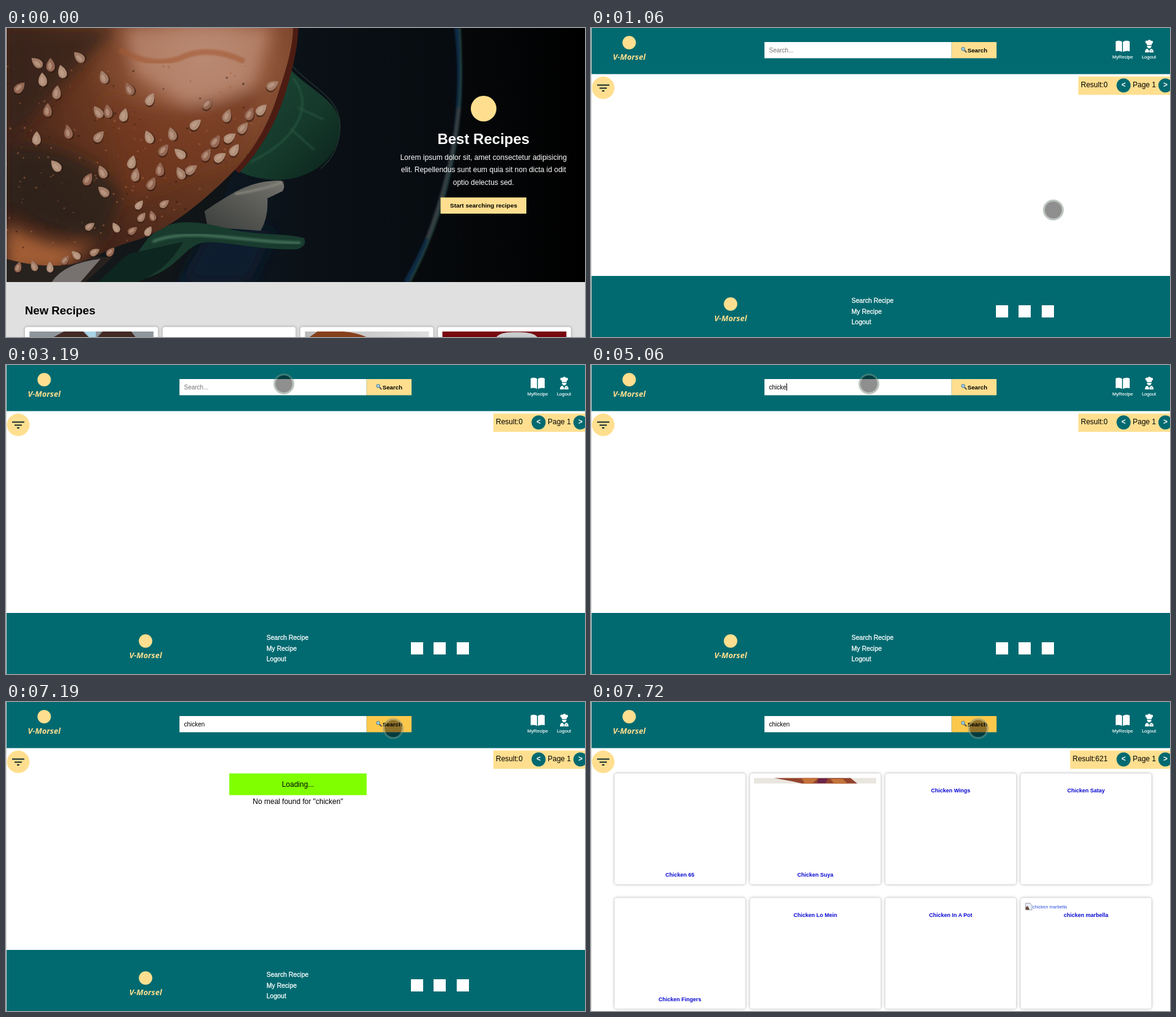
Write an HTML page that moves like this. It is 948 px wide and 506 px high and loops after 7.99 s.

```html
<!DOCTYPE html>
<html lang="en">
<head>
<meta charset="utf-8">
<title>Recipe search</title>
<style>
html, body { margin: 0; width: 100%; height: 100%; overflow: hidden; background: #fff; }
svg { display: block; width: 100%; height: 100%; }
text { font-family: "Liberation Sans", Arial, sans-serif; font-size: 12px; white-space: pre; }
.b { font-weight: bold; }
.mid { text-anchor: middle; }
.w { fill: #fff; }
.teal { fill: #006a70; }
.cream { fill: #ffdf8f; }
.brand { font: italic bold 13px "Noto Sans", sans-serif; fill: #ffdf8f; }
.nav { font-size: 7.6px; fill: #fff; stroke: #fff; stroke-width: .15; }
.link { font-size: 10.5px; fill: #fff; stroke: #fff; stroke-width: .3; }
.title { font-size: 9px; font-weight: bold; fill: #0909d2; }
.card { fill: #fff; filter: drop-shadow(0 0 2px rgba(0,0,0,.35)); }
</style>
</head>
<body>
<svg viewBox="0 0 948 506" preserveAspectRatio="none">
<defs>
  <linearGradient id="night"><stop offset="0" stop-color="#171b1c"/><stop offset=".55" stop-color="#0b1014"/><stop offset=".8" stop-color="#050709"/><stop offset="1" stop-color="#000"/></linearGradient>
  <linearGradient id="plate"><stop offset="0" stop-color="#0e1a27"/><stop offset=".5" stop-color="#0a1015"/><stop offset="1" stop-color="#070b10"/></linearGradient>
  <radialGradient id="crust" gradientUnits="userSpaceOnUse" cx="325" cy="45" r="400">
    <stop offset="0" stop-color="#b58672"/><stop offset=".25" stop-color="#92583c"/><stop offset=".5" stop-color="#6a3820"/><stop offset=".8" stop-color="#4b281b"/><stop offset="1" stop-color="#3a2018"/>
  </radialGradient>
  <linearGradient id="leaf" x1="0" y1="0" x2="1" y2="1"><stop offset="0" stop-color="#1c4a37"/><stop offset=".6" stop-color="#15392b"/><stop offset="1" stop-color="#0b221b"/></linearGradient>
  <linearGradient id="onion" x1="1" y1="0" x2="0" y2="1"><stop offset="0" stop-color="#74736d"/><stop offset="1" stop-color="#3a3d3b"/></linearGradient>
  <linearGradient id="gray"><stop offset="0" stop-color="#b9b9b9"/><stop offset="1" stop-color="#dedede"/></linearGradient>
  <filter id="soft" x="-30%" y="-30%" width="160%" height="160%"><feGaussianBlur stdDeviation="12"/></filter>
  <filter id="haze"><feGaussianBlur stdDeviation="1.5"/></filter>
  <clipPath id="photo"><rect width="948" height="416"/></clipPath>
  <clipPath id="bun"><path id="bunEdge" d="M0 0H470C470 32 458 70 446 106C432 152 410 195 375 232C330 278 270 330 212 348C160 362 140 382 100 388C60 392 25 385 0 378Z"/></clipPath>
  <g id="logo"><circle class="cream" cx="62.5" cy="24" r="11"/><text class="brand mid" x="62.5" y="52">V-Morsel</text></g>
</defs>

<g id="home">
  <rect width="948" height="506" fill="#e0e0e0"/>
  <g clip-path="url(#photo)">
    <rect width="948" height="416" fill="url(#night)"/>
    <path d="M470 0H738C752 110 738 275 658 416H280L330 340Z" fill="url(#plate)"/>
    <path d="M285 416L330 335L440 330L400 416Z" fill="#0e1c2d" filter="url(#soft)"/>
    <g fill="none" filter="url(#haze)">
      <path d="M738 0C752 110 738 275 655 416" stroke="#102a45" stroke-width="8"/>
      <path d="M743 0C752 150 730 285 661 416" stroke="#22423d" stroke-width="3"/>
      <path d="M742 130C736 185 722 260 690 345" stroke="#343c40" stroke-width="6"/>
    </g>
    <path d="M456 55C480 95 549 115 547 162C546 214 500 249 440 249C400 246 380 236 372 226Z" fill="url(#leaf)"/>
    <path d="M470 82C500 120 490 175 400 220M478 130L520 150M466 165L505 200" fill="none" stroke="#2d6049" stroke-width="3" opacity=".6" filter="url(#haze)"/>
    <path d="M452 40C485 95 547 105 547 160C547 190 535 215 515 230" fill="none" stroke="#294239" stroke-width="1.5" opacity=".7"/>
    <path d="M325 300C370 270 400 249 450 250Q459 256 453 267L428 279Q430 310 417 332L330 326Z" fill="url(#onion)"/>
    <path d="M375 272C410 266 440 258 453 252" fill="none" stroke="#858379" stroke-width="4" filter="url(#haze)"/>
    <path d="M232 345C270 305 320 318 370 330C420 341 455 335 488 344Q494 356 478 362C420 366 350 346 320 352C285 360 275 416 180 416Z" fill="#183b2d"/>
    <path d="M240 350C300 325 380 350 482 352" fill="none" stroke="#3f6a55" stroke-width="5" filter="url(#haze)"/>
    <path d="M200 370L290 350C270 385 250 400 215 416H150Z" fill="#0d261f"/>
    <path d="M0 375H175L130 416H0Z" fill="#28221f"/>
    <path d="M75 416Q95 385 155 378L122 416Z" fill="#777270"/>
    <path d="M470 0C470 32 460 70 448 108C434 152 410 195 375 232" fill="none" stroke="#4c1c13" stroke-width="17"/>
    <use href="#bunEdge" fill="url(#crust)"/>
    <g clip-path="url(#bun)">
      <g filter="url(#soft)">
        <path d="M0 0H180L110 75L0 190Z" fill="#32231e" opacity=".75"/>
        <path d="M0 195Q110 180 190 270L160 350L70 330L0 290Z" fill="#29201d" opacity=".75"/>
        <path d="M195 0H435L405 95L300 125L210 75Z" fill="#bd8b75" opacity=".75"/>
        <path d="M160 110Q290 160 425 90L380 205L200 280Z" fill="#71371d" opacity=".65"/>
        <path d="M0 320Q90 370 145 350L90 400H0Z" fill="#a15d36"/>
      </g>
      <path d="M185 35Q245 70 295 45Q340 30 390 55" fill="none" stroke="#a35a35" stroke-width="9" opacity=".6" filter="url(#haze)"/>
      <g id="crumbs"></g>
    </g>
    <g id="seeds"></g>
  </g>
  <circle class="cream" cx="782" cy="132" r="21"/>
  <text class="b w mid" x="781.8" y="190" style="font-size:24px">Best Recipes</text>
  <g class="w mid">
    <text x="781.8" y="216">Lorem ipsum dolor sit, amet consectetur adipisicing</text>
    <text x="781.8" y="236">elit. Repellendus sunt eum quia sit non dicta id odit</text>
    <text x="781.8" y="257">optio delectus sed.</text>
  </g>
  <rect class="cream" x="711.5" y="277.5" width="140.5" height="26.5"/>
  <text class="b mid" x="782" y="294" style="font-size:9.95px">Start searching recipes</text>
  <text class="b" x="31" y="469" style="font-size:18.7px">New Recipes</text>
  <g id="teasers"></g>
  <g>
    <rect x="38.5" y="497" width="203" height="9" fill="#8d969b"/>
    <path d="M78 506L95 497H126L135 506ZM150 506L158 497H205L212 506Z" fill="#432b24"/>
    <path d="M128 497H147V506H136Z" fill="#a9d4e6"/>
    <rect x="489.5" y="497" width="203" height="9" fill="url(#gray)"/>
    <path d="M497 506L510 497H552Q575 499 590 506Z" fill="#87401c"/>
    <rect x="714.5" y="497" width="203" height="9" fill="#770810"/>
    <path d="M803 506Q810 497 835 498Q862 497 870 506Z" fill="#c9cccd"/>
  </g>
</g>

<g id="search">
  <rect class="w" width="948" height="506"/>
  <g id="foot">
    <rect class="teal" y="406" width="948" height="100"/>
    <use href="#logo" x="166" y="428"/>
    <text class="link" x="426.5" y="450">Search Recipe</text>
    <text class="link" x="426.5" y="468">My Recipe</text>
    <text class="link" x="426.5" y="485">Logout</text>
    <path class="w" d="M663 454h20v20h-20zM700 454h20v20h-20zM738 454h20v20h-20z"/>
  </g>
  <rect class="teal" width="948" height="75.5"/>
  <use href="#logo"/>
  <rect class="w" x="284" y="23" width="306.5" height="26.5"/>
  <text id="field" x="291.5" y="40" style="font-size:10px"></text>
  <rect id="caret" y="30" width="1" height="12"/>
  <rect id="button" x="590.5" y="23" width="73.5" height="26.5"/>
  <path d="M611.5 36.5L615 40" stroke="#4a4f55" stroke-width="1.8"/>
  <circle cx="609.3" cy="34.3" r="2.8" fill="#9ccfe8" stroke="#4c7384" stroke-width="1"/>
  <text class="b" x="616.5" y="40" style="font-size:9.7px">Search</text>
  <path class="w" d="M859 22Q865 19.500 869.500 22.500V39Q865 36.500 859 38ZM871 22.500Q876 19.500 882 22V38Q876 36.500 871 39Z"/>
  <path class="w" d="M910 26C905 23 909 19 911.500 21C913 18.500 916 19 916.500 21C920 20 922 24 918 26V28H910ZM910.500 29H917.500V31Q914 36 910.500 31ZM907 40Q907 34.500 911 34L914 37L917 34Q921 34.500 921 40Z"/>
  <path d="M914 36.500V40M916.500 37.500H919" stroke="#006a70" stroke-width=".8"/>
  <text class="nav mid" x="870.5" y="50">MyRecipe</text>
  <text class="nav mid" x="913.500" y="50">Logout</text>
  <circle class="cream" cx="20" cy="98" r="18.500"/>
  <path d="M10 93.500H30M14 98.500H26M18 103H22" stroke="#13292b" stroke-width="2"/>
  <rect id="tally" class="cream" y="79.500" width="170" height="30"/>
  <text id="count" y="97"></text>
  <circle class="teal" cx="872" cy="94" r="11.500"/>
  <circle class="teal" cx="940.500" cy="94" r="11.500"/>
  <text class="b w mid" x="872" y="97">&lt;</text>
  <text class="b w mid" x="940.500" y="97">&gt;</text>
  <text x="887" y="97">Page 1</text>
  <g id="loading">
    <rect x="365.5" y="117" width="225" height="35.500" fill="#80ff00"/>
    <text class="mid" x="478" y="139">Loading...</text>
    <text class="mid" x="478" y="167">No meal found for "chicken"</text>
  </g>
  <g id="cards"></g>
  <g id="pics">
    <rect x="267" y="124.500" width="200" height="9" fill="#e9e6df"/>
    <path d="M300 124.500H425L436 133.500H345L330 130Z" fill="#94442e"/>
    <path d="M345 124.500H372L362 133.500H350ZM392 126H412L420 133.500H398Z" fill="#c4743a"/>
    <path d="M372 125H388L384 133H370Z" fill="#6b2548"/>
    <path d="M711.500 329.500H719L722 332.500V340.500H711.500Z" fill="#e7eefb" stroke="#8b9097" stroke-width=".8"/>
    <path d="M712 340V336L715 334L718 340Z" fill="#6a4637"/>
    <text x="723" y="338" style="font-size:7.5px;fill:#2a50e0">chicken marbella</text>
  </g>
</g>
<rect width="1" height="506" fill="#d6d6d6"/>
<g id="cursor">
  <circle id="dot" r="14"/>
  <circle id="ring" r="15.5" fill="none" stroke="rgba(120,138,125,.5)" stroke-width="3"/>
</g>
</svg>
<script>
const LOOP = 7990;
const $ = id => document.getElementById(id);
const show = (id, on) => $(id).setAttribute('display', on ? 'inline' : 'none');
const add = (parent, tag, attrs, text = '') => {
  const el = document.createElementNS('http://www.w3.org/2000/svg', tag);
  for (const k in attrs) el.setAttribute(k, attrs[k]);
  el.textContent = text;
  parent.append(el);
  return el;
};
let state = 11;
const rand = () => (state = state * 16807 % 2147483647) / 2147483647;

// Sesame seeds and crust speckles
const seeds = [51,57, 73,61, 92,72, 120,48, 22,98, 60,85, 83,106, 68,135, 50,181, 160,81, 202,100, 236,117,
  151,138, 167,137, 193,143, 152,178, 102,171, 82,226, 158,236, 134,248, 206,220, 212,241, 252,232, 234,179,
  272,174, 258,200, 285,206, 286,238, 330,124, 310,158, 362,144, 343,186, 366,180, 388,164, 399,141, 418,134,
  436,94, 328,208, 350,212, 160,268, 238,255, 218,290, 259,288, 240,308, 180,327, 222,310, 207,332, 233,333,
  145,367, 97,380, 72,392, 46,390, 20,392, 115,372, 137,325, 171,367, 374,200, 303,232];
for (let i = 0; i < seeds.length; i += 2) {
  const [x, y] = [seeds[i], seeds[i + 1]];
  const big = y > 280 ? 0.8 : 1;
  const g = add($('seeds'), 'g', {
    transform: `translate(${x} ${y}) rotate(${x > 300 ? 20 + rand() * 40 : rand() * 110 - 50}) scale(${big})`
  });
  const drop = 'M0-12C5-7 9 1 6 7Q0 14-6 7C-9 1-5-7 0-12Z';
  add(g, 'path', { d: drop, fill: '#2b1711', opacity: .55, transform: 'translate(2 2)' });
  add(g, 'path', { d: drop, fill: ['#a27c67', '#946753', '#b08e78'][i / 2 % 3] });
  add(g, 'ellipse', { cx: -1, cy: 1, rx: 3, ry: 6, fill: '#c5a590', opacity: .6 });
}
for (let i = 0; i < 260; i++) {
  add($('crumbs'), 'circle', {
    cx: rand() * 420, cy: 60 + rand() * 320, r: .6 + rand() * 1.5,
    fill: i % 3 ? '#a5643f' : '#2d1912', opacity: .5
  });
}
for (let i = 0; i < 4; i++)
  add($('teasers'), 'rect', { class: 'card', x: 31 + i * 225.4, y: 489.5, width: 217.8, height: 30, rx: 4 });

const meals = ['65', 'Suya', 'Wings', 'Satay', 'Fingers', 'Lo Mein', 'In A Pot', 'marbella', 'Soup', 'Curry', 'Pho', 'Salad'];
const tall = [0, 1, 4];
const cards = meals.map((meal, i) => {
  const x = 38.5 + i % 4 * 221.65;
  const box = add($('cards'), 'rect', { class: 'card', x, width: 214.2, rx: 4 });
  const label = add($('cards'), 'text', { class: 'title mid', x: x + 107.1 },
    (meal === 'marbella' ? 'chicken ' : 'Chicken ') + meal);
  return { box, label };
});
function layCards(loaded) {
  const h = loaded ? 181.5 : 43;
  cards.forEach(({ box, label }, i) => {
    const y = 117 + Math.floor(i / 4) * (h + 22.3);
    box.setAttribute('y', y);
    box.setAttribute('height', h);
    label.setAttribute('y', y + (loaded && tall.includes(i) ? 169 : 31));
  });
}

const moves = [[250, 743, 360], [530, 757, 298], [1590, 755, 282], [1860, 504, 99], [2120, 455, 15],
  [2390, 455, 27], [3190, 455, 31], [6140, 597, 15], [6400, 632, 45], [6660, 634, 43.5]];
const typing = [[3720, 1], [3990, 2], [4260, 3], [4530, 5], [5060, 6], [5330, 7]];
const carets = [0, 296, 302, 304, 309, 314, 320, 325];
const at = (list, t) => list.filter(s => s[0] <= t).pop();
const within = (t, a, b) => t >= a && t < b;

function draw(t) {
  const home = t < 1060;
  show('home', home);
  show('search', !home);

  const pos = at(moves, t);
  show('cursor', pos);
  if (pos) $('cursor').setAttribute('transform', `translate(${pos[1]} ${pos[2]})`);
  const press = within(t, 800, 1060);
  $('dot').setAttribute('fill', press ? 'rgba(245,235,0,.52)' : 'rgba(0,0,0,.44)');
  show('ring', !press);

  const n = (at(typing, t) || [0, 0])[1];
  $('field').textContent = n ? 'chicken'.slice(0, n) : 'Search...';
  $('field').setAttribute('fill', n ? '#000' : '#757575');
  $('caret').setAttribute('x', n ? carets[n] : 291);
  show('caret', within(t, 2660, 3190) || within(t, 3720, 5610) || within(t, 6140, 6660));
  $('button').setAttribute('fill', t < 6930 ? '#ffdf8f' : t < 7190 ? '#fed46d' : '#fcc84c');

  const found = t >= 7460;
  show('loading', within(t, 6930, 7460));
  $('tally').setAttribute('x', found ? 784.5 : 798);
  $('count').setAttribute('x', found ? 788.5 : 802);
  $('count').textContent = 'Result:' + (found ? 621 : 0);
  show('cards', found);
  show('pics', t >= 7720);
  show('foot', t < 7720);
  layCards(t >= 7720);
}

const start = performance.now();
function tick() {
  draw((performance.now() - start) % LOOP);
  requestAnimationFrame(tick);
}
tick();
</script>
</body>
</html>
```
